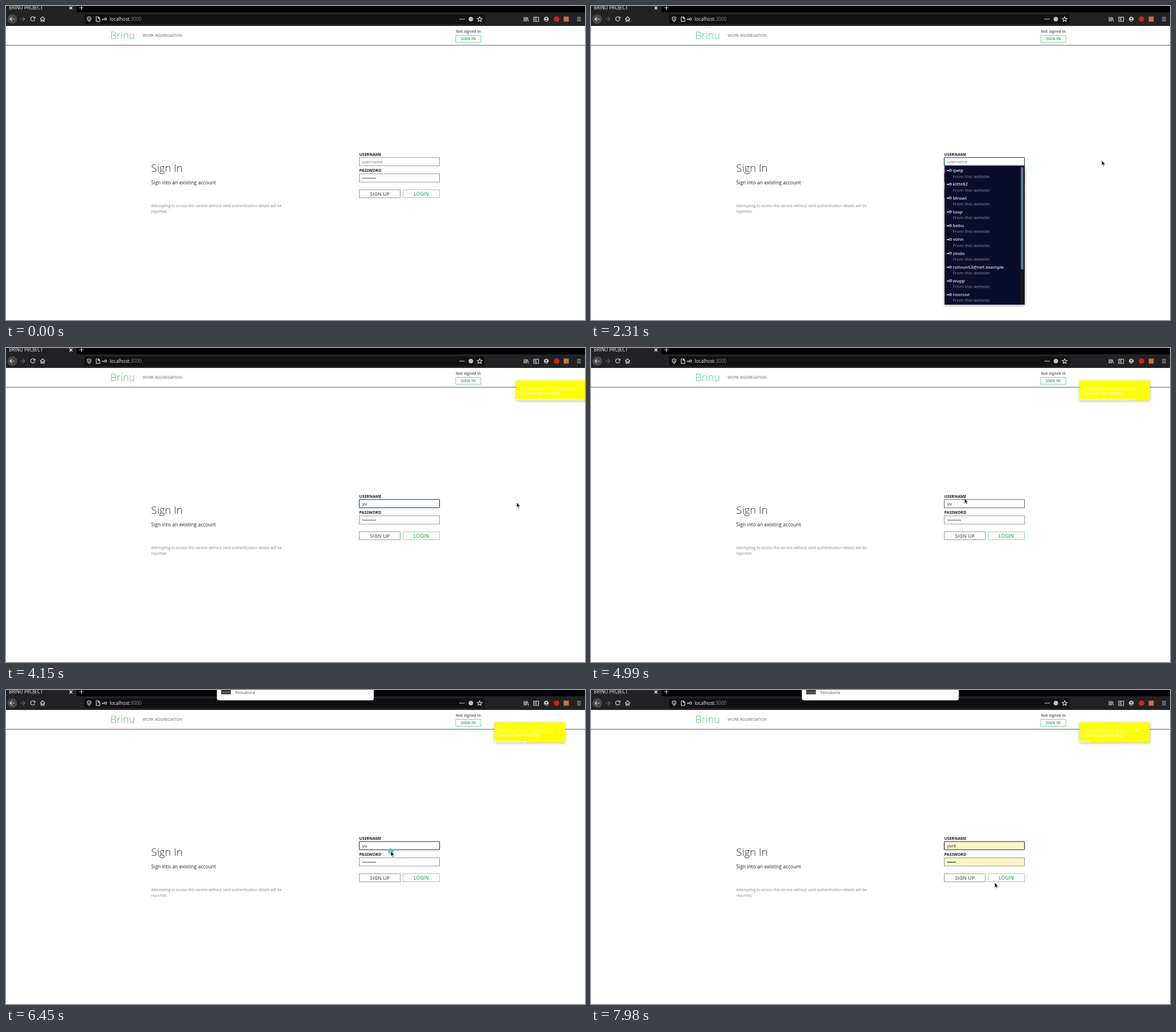
Recreate the animation shown at these times as an HTML page. Size 1017x551 px, loop 8 s.

```html
<!DOCTYPE html>
<html lang="en">
<head>
<meta charset="utf-8">
<title>Sign in</title>
<style>
  html, body { margin: 0; width: 100%; height: 100%; overflow: hidden; background: #fff; }
  svg { display: block; width: 1017px; height: 551px; font-family: "Open Sans", "Noto Sans", sans-serif; }
  text { white-space: pre; }
  .line { fill: none; stroke: #d0d0d2; stroke-width: 1.2; }
  .box { fill: #fff; stroke: #9a9a9a; }
  .popup { filter: drop-shadow(0 1px 2px rgba(0, 0, 0, .45)); }
  .soft { filter: drop-shadow(0 1px 2px rgba(0, 0, 0, .3)); }
</style>
</head>
<body>
<svg id="stage" viewBox="0 0 1017 551"></svg>
<script>
const LOOP = 8000;
const stage = document.getElementById('stage');

const text = (x, y, size, fill, str, weight = 400, extra = '') =>
  `<text x="${x}" y="${y}" font-size="${size}" fill="${fill}" font-weight="${weight}" ${extra}>${str}</text>`;
const rect = (x, y, w, h, fill, extra = '') =>
  `<rect x="${x}" y="${y}" width="${w}" height="${h}" fill="${fill}" ${extra}/>`;
const box = (x, y, w, h, extra = '') =>
  `<rect class="box" x="${x}" y="${y}" width="${w}" height="${h}" ${extra}/>`;
const disc = (x, y, r, fill, extra = '') => `<circle cx="${x}" cy="${y}" r="${r}" fill="${fill}" ${extra}/>`;
const line = (d, extra = '') => `<path class="line" d="${d}" ${extra}/>`;
const centered = 'text-anchor="middle"';
const dots = (count, fill) =>
  Array.from({ length: count }, (_, i) => disc(627.3 + i * 3, 302.2, 1.1, fill)).join('');
const key = (x, y) => line(`M${x} ${y}h4.6M${x + .8} ${y}v1.6M${x + 2.6} ${y}v1.6`) +
  disc(x + 6.4, y, 1.8, 'none', 'stroke="#d0d0d2" stroke-width="1.2"');

// Browser chrome
const chrome =
  rect(0, 0, 1017, 11, '#000') + rect(0, 0, 124, 12, '#222224') + rect(0, 11, 1017, 24, '#222224') +
  text(5, 6.3, 8.2, '#f2f2f2', 'BRINU PROJECT') +
  line('M111.5 1l5 5m0-5l-5 5', 'style="stroke:#fff"') + line('M128.5 3h8m-4-4v8') +
  disc(11, 23, 8.5, '#48484a') + line('M15 23h-8m3.5-3.5L7 23l3.5 3.5') +
  line('M25 23h8m-3.5-3.5L33 23l-3.500 3.500', 'opacity=".4"') +
  line('M50 20.500a3.700 3.700 0 1 0 .6 3M51 18.500v3h-3') +
  line('M60 23l4.300-4.200 4.300 4.200M61.500 22.500v4.500h1.800v-3h2v3h1.800v-4.500') +
  rect(137, 15, 704, 16.500, '#111113', 'rx="2"') +
  line('M146 19l3.300 1.100c0 4-.8 5.600-3.300 7.100-2.500-1.500-3.300-3.100-3.300-7.100zM146 21v4') +
  line('M158.500 19h3.800l2.500 2.500v5.700h-6.300zM162 19v3h2.800') +
  key(168.500, 23) +
  text(182, 26.300, 8.300, '#f4f4f4', 'localhost<tspan fill="#8e8e91">:3000</tspan>') +
  [797.8, 801, 804.2].map(x => disc(x, 23, 1.1, '#d0d0d2')).join('') +
  disc(816.500, 23, 4, '#bdbdc0') +
  line('M832 18.800l1.200 2.900 3.100.2-2.400 2 .8 3.100-2.700-1.700-2.700 1.700.8-3.100-2.400-2 3.100-.2z', 'stroke-width="1"') +
  line('M910 19.500v7.500m2.200-7.500v7.500m2.200-7.500v7.500m1.300-7l2 7') +
  line('M927 19.500h8.500v7.500h-8.500zM931 19.500v7.500M928.500 22h1.500m-1.500 2h1.500') +
  disc(949, 23, 4.200, '#c9c9cb') + disc(949, 21.700, 1.300, '#222224') + line('M946.700 25.300h4.600', 'style="stroke:#222224"') +
  disc(967, 23, 4.800, '#d8200f') + rect(979.500, 18.500, 9, 9, '#c9713c') +
  line('M1003 20h7m-7 3h7m-7 3h7');

// Page
const page =
  text(183, 58, 18, '#50c878', 'Brinu', 300) +
  text(240, 53.900, 6.870, '#666', 'WORK AGGREGATION') +
  text(812, 46.800, 6.650, '#707070', 'Not signed in', 700, centered) +
  box(790, 51.500, 44, 12, 'style="stroke:#79d29a"') +
  text(812, 60, 6.800, '#3cba68', 'SIGN IN', 700, centered) +
  rect(0, 68.300, 1017, 1.200, '#777') +
  text(255, 290.500, 18.600, '#333', 'Sign In', 300) +
  text(255, 313.200, 8.600, '#222', 'Sign into an existing account') +
  text(255, 353, 6.550, '#858585', 'Attempting to access this service without valid authentication details will be') +
  text(255, 363.300, 6.550, '#858585', 'reported.') +
  text(620.500, 262.700, 7, '#1c1c1c', 'USERNAME', 700) +
  text(620.500, 291.300, 7, '#1c1c1c', 'PASSWORD', 700) +
  box(620.500, 265.900, 141, 14.500, 'id="user"') + box(620.500, 294.500, 141, 14.500, 'id="pass"') +
  text(625.500, 276.200, 7.650, '#222', '', 400, 'id="typed"') + rect(626, 269, .9, 9, '#222', 'id="caret"') +
  `<g id="hint">${dots(8, '#666')}</g><g id="secret">${dots(5, '#222')}</g>` +
  box(620.500, 322.500, 72, 14) + text(656.500, 332.500, 8.700, '#666', 'SIGN UP', 600, centered) +
  box(697.500, 322.500, 64, 14, 'style="stroke:#8fdcab"') + text(729.300, 332.500, 8.500, '#3cba68', 'LOGIN', 600, centered);

// Login suggestions
const suggestion = (name, i) => {
  const y = 288.500 + i * 24.220;
  return key(625, y) + text(635.500, y + 2.700, 7.900, '#dcdce4', name, 600) +
    text(635.500, y + 13, 7.850, '#8b8d96', 'From this website');
};
const logins = ['qwip', 'kitte82', 'Mrowl', 'luup', 'bebu', 'vonn', 'zindo', 'rolivun53@nef.example', 'wupp', 'nooruvi'];
const popups =
  `<g id="list" class="popup">${rect(621, 280.500, 140.500, 243.500, '#090d2c')}${rect(754, 280.500, 7.500, 243.500, '#15161c')}` +
  `${rect(755, 283, 4.500, 179.500, '#5f7896', 'rx="2"')}${logins.map(suggestion).join('')}</g>` +
  `<g id="match" class="popup">${rect(621, 280.500, 140.500, 47.500, '#090d2c')}${rect(621, 305.300, 140.500, 22.200, '#4b4b4e')}` +
  `${suggestion('yurli', 0)}${text(690.500, 319.700, 7.900, '#e0e0e2', 'View Saved Logins', 400, centered)}</g>`;

const overlays =
  `<g id="toast" class="soft">${rect(858, 57, 124, 35, '#ff0', 'rx=".5"')}` +
  text(863.500, 73.700, 9.200, '#fffff0', 'Username or password') + text(863.500, 82, 9.200, '#fffff0', 'cannot be empty') +
  line('M972 64l3.500 3.500m0-3.500l-3.500 3.500', 'style="stroke:#ffffd0;stroke-width:.8"') +
  `${rect(858, 89.300, 124, 2.700, '#fff', 'id="progress" opacity=".85"')}</g>` +
  `<g id="notice" class="soft">${rect(370.500, -12, 275.500, 30, '#fff', 'rx="3.500" stroke="#999"')}` +
  `${rect(378, -10, 17, 17.500, '#35362f')}${rect(378, 3, 17, 2, '#66685a')}${text(403, 7.200, 7.700, '#555', 'Fenubora')}</g>` +
  disc(0, 0, 5, '#57bdec', 'id="ring" opacity=".9"') +
  '<path id="cursor" d="M0 0v8.800l2.100-1.900 1.500 3.400 1.500-.7-1.500-3.200h2.900z" fill="#111" stroke="#fff" stroke-width=".6"/>';

stage.innerHTML = chrome + page + popups + overlays;
const el = Object.fromEntries([...stage.querySelectorAll('[id]')].map(node => [node.id, node]));

// Keys are [time, ...values]; each stretch between two keys is eased on its own.
function track(keys, t, ease) {
  const next = keys.findIndex(k => k[0] > t);
  if (next === 0) return keys[0].slice(1);
  if (next < 0) return keys[keys.length - 1].slice(1);
  const a = keys[next - 1], b = keys[next];
  const p = ease((t - a[0]) / (b[0] - a[0]));
  return a.slice(1).map((v, i) => v + (b[i + 1] - v) * p);
}
const smooth = p => p * p * (3 - 2 * p);
const easeOut = p => 1 - (1 - p) ** 3;

const pointer = [
  [830, 655, 262], [950, 654, 271], [1169, 654, 271], [1170, 654, 276], [1330, 654, 276], [1650, 897, 271],
  [4190, 897, 271], [4500, 770, 303], [4800, 657, 268], [4870, 656, 264], [4990, 656, 264],
  [5140, 657, 272], [5400, 657, 272], [5700, 676, 283], [6650, 676, 283],
  [7300, 680, 333], [7500, 645, 340], [7750, 675, 342], [7980, 709, 338]
];
const bounce = [[3864, 1590], [4284, -13], [4389, 5], [4494, -2.5], [4564, 0]];

const during = (t, ...spans) => spans.some(([from, to]) => t >= from && t < to);
const show = (node, on) => { node.style.display = on ? '' : 'none'; };
const move = (node, x, y) => node.setAttribute('transform', `translate(${x} ${y})`);

function draw(t) {
  const filled = t >= 6490;
  const focused = during(t, [1170, 4700], [5140, LOOP]);
  const hovered = during(t, [870, 1170], [4800, 5140]);
  const typed = filled ? 'yurli' : t >= 3200 ? 'yu' : t >= 3060 ? 'y' : '';

  el.typed.textContent = typed || 'username';
  el.typed.setAttribute('fill', typed ? '#222' : '#777');
  el.user.style.stroke = focused ? '#285487' : hovered ? '#59666a' : '';
  el.user.style.strokeWidth = focused ? 1.4 : 1;
  el.user.setAttribute('rx', focused ? 1.5 : 0);
  el.user.style.fill = el.pass.style.fill = filled ? '#fef4c8' : '';
  show(el.hint, !filled);
  show(el.secret, filled);
  show(el.caret, during(t, [1170, 2310], [3060, 3490], [5140, 5700]));
  el.caret.setAttribute('x', typed ? 625.5 + el.typed.getComputedTextLength() + .3 : 625.6);
  show(el.list, during(t, [1170, 3100]));
  show(el.match, during(t, [3100, 3790], [5180, 6450]));

  show(el.toast, t >= 4065);
  move(el.toast, track(bounce, t, easeOut)[0], 0);
  el.progress.setAttribute('width', Math.max(0, Math.min(124, 124 - (t - 3869) * .02593)));

  show(el.notice, t >= 5900);
  move(el.notice, 0, track([[5900, -22], [6100, 0]], t, easeOut)[0]);

  const [x, y] = track(pointer, t, smooth);
  show(el.cursor, t >= 830);
  show(el.ring, during(t, [1190, 1330], [5140, 5280], [6410, 6570]));
  move(el.cursor, x, y);
  move(el.ring, x, y);
}

const start = performance.now();
function tick() {
  draw((performance.now() - start) % LOOP);
  requestAnimationFrame(tick);
}
tick();
</script>
</body>
</html>
```
